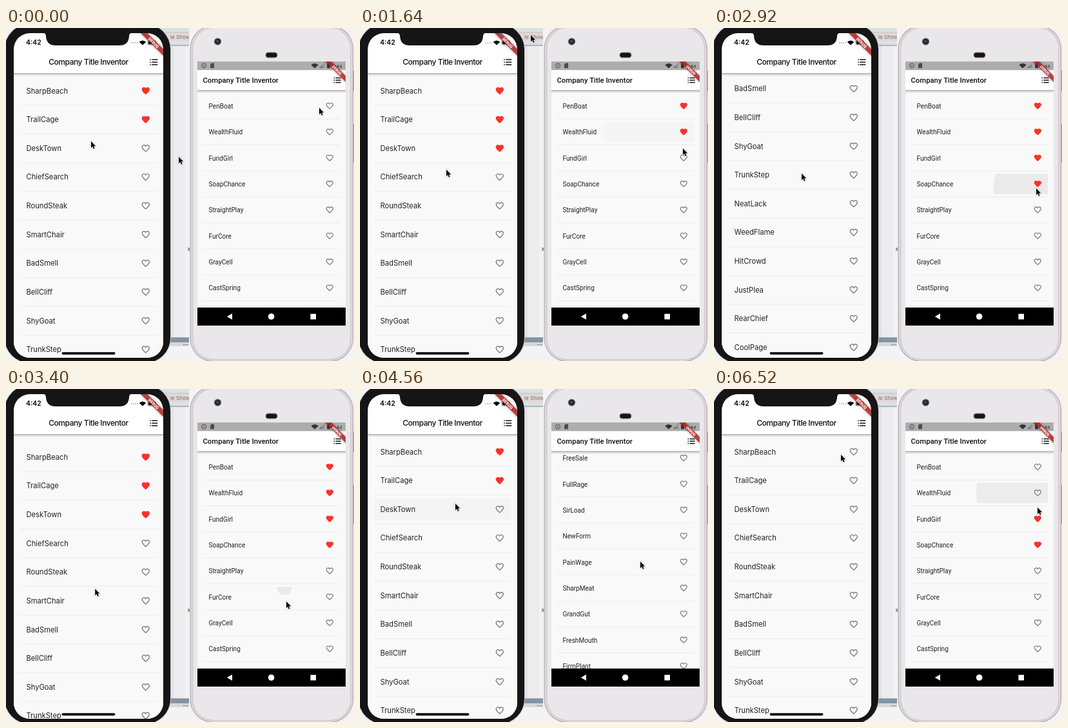
Animation of 540 by 517 pixels, one loop 6560 ms. Source, as an HTML page with a canvas:

```html
<!DOCTYPE html>
<html lang="en">
<head>
<meta charset="utf-8">
<title>Two phones</title>
<style>
html, body { margin: 0; width: 100%; height: 100%; overflow: hidden; background: #f4f3f4; }
canvas { display: block; width: 540px; height: 517px; }
</style>
</head>
<body>
<canvas id="stage"></canvas>
<script>
const LOOP = 6560, STEP = 40, W = 540, H = 517;
const stage = document.getElementById('stage');
const ratio = window.devicePixelRatio || 1;
stage.width = W * ratio;
stage.height = H * ratio;
const c = stage.getContext('2d');
c.scale(ratio, ratio);

const SANS = 'Inter, "Open Sans", sans-serif';
const ROBOTO = 'Roboto, "Noto Sans", sans-serif';
const TITLE = 'Company Title Inventor';
const HEART = new Path2D('M12 21.35l-1.45-1.32C5.4 15.36 2 12.28 2 8.5 2 5.42 4.42 3 7.5 3c1.74 0 3.41.81 4.5 2.09C13.09 3.81 14.76 3 16.5 3 19.58 3 22 5.42 22 8.5c0 3.78-3.4 6.86-8.55 11.54z');

const left = {
  x: 12, top: 70, w: 232, bottom: 512, scale: 0.62,
  first: 97.6, pitch: 44.62, textX: 31.5, heartX: 216.8,
  font: '11.2px ' + SANS,
  names: 'SharpBeach TrailCage DeskTown ChiefSearch RoundSteak SmartChair BadSmell BellCliff ShyGoat TrunkStep NeatLack WeedFlame HitCrowd JustPlea RearChief CoolPage MildRope LakeDoor'.split(' '),
  liked: [0, 1],
  toggles: [[2, 760], [2, 4440], [1, 5040], [0, 5640]],
  ripples: [
    { row: 2, x: 132, y: 180, t: 600, speed: 0.5, tone: 0.018 },
    { row: 2, x: 148, y: 182, t: 4320, speed: 0.8, tone: 0.018 },
    { row: 1, x: 150, y: 140, t: 4920, speed: 0.5, tone: 0.018 },
    { row: 0, x: 150, y: 101, t: 5520, speed: 0.5, tone: 0.018 }
  ],
  scroll: [[0, 0], [1720, 0], [2000, 110], [2640, 290], [2800, 290], [2920, 271],
           [3120, 165], [3440, -16], [3840, -0.5], [4000, 0]],
  cursor: [[0, 132, 176], [1400, 132, 176], [1640, 134, 220], [1720, 134, 220], [2000, 135, 130],
           [2240, 135, 130], [2780, 136, 207], [2920, 136, 226], [3140, 137, 320], [3300, 138, 320],
           [3840, 141, 213], [4240, 148, 178], [4600, 148, 178], [4880, 150, 138], [5120, 150, 138],
           [5480, 150, 100], [6160, 150, 100], [6520, 197, 102]]
};

const right = {
  x: 297, top: 96.5, w: 230, bottom: 434, scale: 0.56,
  first: 121, pitch: 40.35, textX: 314.5, heartX: 502.3,
  font: '10.1px ' + ROBOTO,
  names: 'PenBoat WealthFluid FundGirl SoapChance StraightPlay FurCore GrayCell CastSpring GreekFork FreeSale FullRage SirLoad NewForm PainWage SharpMeat GrandGut FreshMouth FirmPlant LampRoad DuskMint ColdPath'.split(' '),
  liked: [],
  toggles: [[0, 560], [1, 1280], [2, 2040], [3, 2800], [0, 5640], [1, 6280]],
  ripples: [
    { row: 0, x: 500, y: 123, t: 450 },
    { row: 1, x: 501, y: 163, t: 1170 },
    { row: 2, x: 501, y: 204, t: 1930 },
    { row: 3, x: 500, y: 248, t: 2690 },
    { row: 5, x: 432, y: 309, t: 3380, speed: 0.015, hold: 440 },
    { row: 0, x: 504, y: 120, t: 5530 },
    { row: 1, x: 502, y: 163, t: 6170 }
  ],
  scroll: [[0, 0], [3440, 0], [3840, 205.5], [4240, 480], [4400, 480], [4560, 377], [5000, 0]],
  cursor: [[0, 486, 124], [320, 500, 121], [640, 500, 121], [1040, 501, 160], [1360, 501, 160],
           [1640, 501, 187], [1840, 501, 203], [2120, 501, 203], [2560, 500, 247], [2920, 500, 249],
           [3320, 435, 330], [3440, 435, 330], [3840, 435, 134], [4000, 435, 120], [4360, 435, 165],
           [4560, 435, 268], [4720, 436, 345], [4880, 436, 345], [5400, 504, 117], [5720, 504, 117],
           [6080, 502, 160], [6360, 502, 160], [6520, 502, 184]]
};

const spare = [[0, 268, 200], [700, 268, 200], [1640, 265, 11], [1760, 265, -16]];

// Eased value of a keyed track: [time, value...]
function at(keys, t) {
  let i = keys.findIndex(k => k[0] > t);
  if (i < 0) return keys[keys.length - 1].slice(1);
  const a = keys[i - 1], b = keys[i];
  let u = (t - a[0]) / (b[0] - a[0]);
  u = u * u * (3 - 2 * u);
  return a.slice(1).map((v, n) => v + (b[n + 1] - v) * u);
}

function rect(x, y, w, h, color) {
  c.fillStyle = color;
  c.fillRect(x, y, w, h);
}

function round(x, y, w, h, r, color) {
  c.beginPath();
  c.roundRect(x, y, w, h, r);
  if (color) { c.fillStyle = color; c.fill(); }
}

function disc(x, y, r, color) {
  c.beginPath();
  c.arc(x, y, r, 0, Math.PI * 2);
  c.fillStyle = color;
  c.fill();
}

function poly(points, color) {
  c.beginPath();
  points.forEach(p => c.lineTo(p[0], p[1]));
  c.closePath();
  c.fillStyle = color;
  c.fill();
}

function text(s, x, y, font, color, align = 'left', spacing = 0) {
  c.font = font;
  c.letterSpacing = spacing + 'px';
  c.textAlign = align;
  c.textBaseline = 'alphabetic';
  c.fillStyle = color;
  c.fillText(s, x, y);
}

function wifi(x, y, r, color) {
  c.beginPath();
  c.moveTo(x, y);
  c.arc(x, y, r, -Math.PI * 0.77, -Math.PI * 0.23);
  c.closePath();
  c.fillStyle = color;
  c.fill();
}

function heart(x, y, scale, on) {
  c.save();
  c.translate(x - 12 * scale, y - 12 * scale);
  c.scale(scale, scale);
  if (on) {
    c.fillStyle = '#f9322a';
    c.fill(HEART);
  } else {
    c.clip(HEART);
    c.lineWidth = 4;
    c.strokeStyle = '#757575';
    c.stroke(HEART);
  }
  c.restore();
}

function menu(x, y, scale) {
  for (let i = -1; i <= 1; i++) {
    const ly = y + i * 4 * scale / 0.62 * 0.98 - 0.7;
    rect(x, ly, 1.6, 1.5, '#111');
    rect(x + 2.9, ly, 14.6 * scale, 1.5, '#111');
  }
}

function ripple(p, r, t) {
  const age = t - r.t, hold = r.hold || 320;
  if (age < 0 || age > hold + 200) return;
  const fade = 1 - Math.max(0, age - hold) / 200;
  const h = 56 * p.scale, pad = 16 * p.scale;
  c.save();
  c.beginPath();
  c.rect(p.x + pad, p.first + r.row * p.pitch - h / 2, p.w - 2 * pad, h);
  c.clip();
  disc(r.x, r.y, 11 + age * (r.speed || 0.24), `rgba(0,0,0,${(r.tone || 0.06) * fade})`);
  c.restore();
}

function list(p, t) {
  const offset = at(p.scroll, t)[0], pad = 16 * p.scale;
  c.save();
  c.beginPath();
  c.rect(p.x, p.top, p.w, p.bottom - p.top);
  c.clip();
  rect(p.x, p.top, p.w, p.bottom - p.top, '#f9f9fa');
  c.translate(0, -offset);
  p.ripples.forEach(r => ripple(p, r, t));
  p.names.forEach((name, i) => {
    const y = p.first + i * p.pitch;
    if (y - offset < p.top - 30 || y - offset > p.bottom + 30) return;
    const flips = p.toggles.filter(k => k[0] === i && t >= k[1]).length;
    const on = p.liked.includes(i) !== (flips % 2 === 1);
    text(name, p.textX, y + 4, p.font, '#222');
    heart(p.heartX, y, p.scale, on);
    rect(p.x + pad, y + p.pitch / 2 - 0.3, p.w - 2 * pad, 0.7, '#e6e6e6');
  });
  c.restore();
}

function barShadow(p) {
  const g = c.createLinearGradient(0, p.top, 0, p.top + 5);
  g.addColorStop(0, 'rgba(0,0,0,.36)');
  g.addColorStop(0.35, 'rgba(0,0,0,.14)');
  g.addColorStop(1, 'rgba(0,0,0,0)');
  rect(p.x, p.top, p.w, 5, g);
}

function banner(x, y, scale) {
  c.save();
  c.translate(x, y);
  c.rotate(Math.PI / 4);
  c.scale(scale, scale);
  c.shadowColor = 'rgba(0,0,0,.45)';
  c.shadowBlur = 4 * ratio;
  rect(-42, 28, 84, 12, 'rgba(183,28,28,.76)');
  c.shadowColor = 'transparent';
  text('DEBUG', 0, 37.7, '900 10.2px ' + ROBOTO, '#fff', 'center');
  c.restore();
}

function pointer(track, t) {
  const [x, y] = at(track, t);
  c.save();
  c.translate(x, y);
  c.beginPath();
  [[0, 0], [0, 10.2], [2.3, 8.1], [3.9, 11.7], [5.6, 10.9], [4, 7.4], [7.2, 7.3]]
    .forEach(p => c.lineTo(p[0], p[1]));
  c.closePath();
  c.lineJoin = 'round';
  c.lineWidth = 1.6;
  c.strokeStyle = '#fff';
  c.shadowColor = 'rgba(0,0,0,.3)';
  c.shadowBlur = 2 * ratio;
  c.stroke();
  c.shadowColor = 'transparent';
  c.fillStyle = '#000';
  c.fill();
  c.restore();
}

function backdrop() {
  rect(0, 0, W, H, '#f4f3f4');
  rect(238, 0, 47, 7, '#dbe0e3');
  rect(238, 7, 46, 13, '#e2d8d7');
  rect(238, 6.5, 46, 0.8, '#bdb7b8');
  text('le Show', 255, 17, '8.2px ' + SANS, '#77706f');
  rect(238, 20, 46, 6, '#dde1e4');
  rect(238, 26, 46, 2, '#a9b6c1');
  rect(238, 28, 46, 452, '#ececee');
  rect(255, 28, 5, 452, '#e2e3e6');
  rect(278, 28, 6, 452, '#f2f2f3');
  rect(238, 480, 46, 1, '#a8adb2');
  rect(238, 481, 46, 7, '#8295a5');
  rect(238, 488, 46, 6, '#d7d8da');
  for (let i = 0; i < 3; i++) rect(275 + i * 3, 491, 1.6, 1.4, '#777');
}

function leftPhone(t) {
  round(-3, -7, 259, 528, 40, '#c9c9ca');
  round(-2, -6, 257, 526, 39, '#151515');
  c.save();
  round(12, 8, 232, 504, 25);
  c.clip();
  rect(12, 8, 232, 504, '#fff');
  list(left, t);
  barShadow(left);
  text('4:42', 31, 26, '600 10.4px ' + SANS, '#000');
  text(TITLE, 128, 57.2, '500 12px ' + SANS, '#111', 'center', -0.45);
  menu(223.3, 53, 0.62);
  for (let i = 0; i < 4; i++) disc(195 + i * 3, 23, 0.75, '#777');
  wifi(212, 26.4, 7, '#000');
  c.lineWidth = 0.8;
  c.strokeStyle = '#555';
  round(220, 19.5, 12.5, 6.5, 1.8);
  c.stroke();
  round(221, 20.5, 10.5, 4.5, 1, '#000');
  banner(244, 8, 0.62);
  c.restore();
  // notch
  c.beginPath();
  c.moveTo(57, 7);
  c.quadraticCurveTo(62, 8, 62, 13);
  c.quadraticCurveTo(63, 27, 77, 27);
  c.lineTo(176, 27);
  c.quadraticCurveTo(190, 27, 191, 13);
  c.quadraticCurveTo(191, 8, 196, 7);
  c.fillStyle = '#151515';
  c.fill();
  round(86.5, 503.3, 83, 3.6, 1.8, '#000');
}

function rightPhone(t) {
  rect(284, 0, 256, H, '#f4f3f4');
  text('x', 281.5, 346, '8px ' + SANS, '#333');
  rect(537.5, 66, 2.5, 32, '#aaa4a8');
  rect(537.5, 149, 2.5, 60, '#aaa4a8');
  round(285.5, -4, 253.5, 522, 36, '#a9a4a9');
  round(286.5, -3, 251.5, 520, 35, '#ddd5da');
  round(289.5, -1, 245.5, 516, 33, '#c5bfc4');
  round(290.3, -0.2, 244, 514.5, 32, '#e9e7ea');
  disc(328.5, 21, 5.6, '#555a5e');
  disc(328.5, 21, 4.3, '#25292d');
  disc(328.2, 20.5, 1.4, '#56636c');
  round(402.5, 37.5, 19, 9, 4.5, '#8b888a');
  round(403.5, 38.4, 17, 7.2, 3.6, '#151515');

  c.save();
  c.beginPath();
  c.rect(297, 52, 230, 410);
  c.clip();
  rect(297, 52, 230, 13.5, '#adadad');
  rect(297, 65.5, 230, 31, '#fff');
  list(right, t);
  barShadow(right);
  const ink = '#4b4b4b';
  c.lineWidth = 1;
  c.strokeStyle = ink;
  c.beginPath();
  c.arc(307, 58.5, 3.6, 0, Math.PI * 2);
  c.stroke();
  disc(307, 58.5, 1.5, '#777');
  poly([[317, 56.5], [319, 54.5], [323, 54.5], [323, 62.3], [317, 62.3]], ink);
  wifi(479, 62.4, 7.4, '#333');
  poly([[486, 62], [494, 62], [494, 54]], '#8f8f8f');
  poly([[486, 62], [490, 62], [490, 58]], '#707070');
  rect(498.2, 55, 4.6, 7.4, '#333');
  rect(499.5, 54, 2, 1, '#333');
  text('4:44', 506, 62, '8px ' + ROBOTO, '#333');
  text(TITLE, 305.5, 85, '500 11.3px ' + ROBOTO, '#111');
  menu(508.6, 81, 0.56);
  banner(527, 52, 0.56);
  rect(297, 434, 230, 28, '#000');
  poly([[342.8, 448], [351, 443.3], [351, 452.7]], '#fff');
  disc(411.6, 448, 4.8, '#fff');
  rect(472.4, 443.8, 8.6, 8.6, '#fff');
  c.restore();
}

function frame() {
  const now = performance.now() % LOOP;
  const t = Math.floor(now / STEP) * STEP;
  backdrop();
  leftPhone(t);
  rightPhone(t);
  pointer(left.cursor, t);
  pointer(right.cursor, t);
  pointer(spare, t);
  requestAnimationFrame(frame);
}
frame();
</script>
</body>
</html>
```
